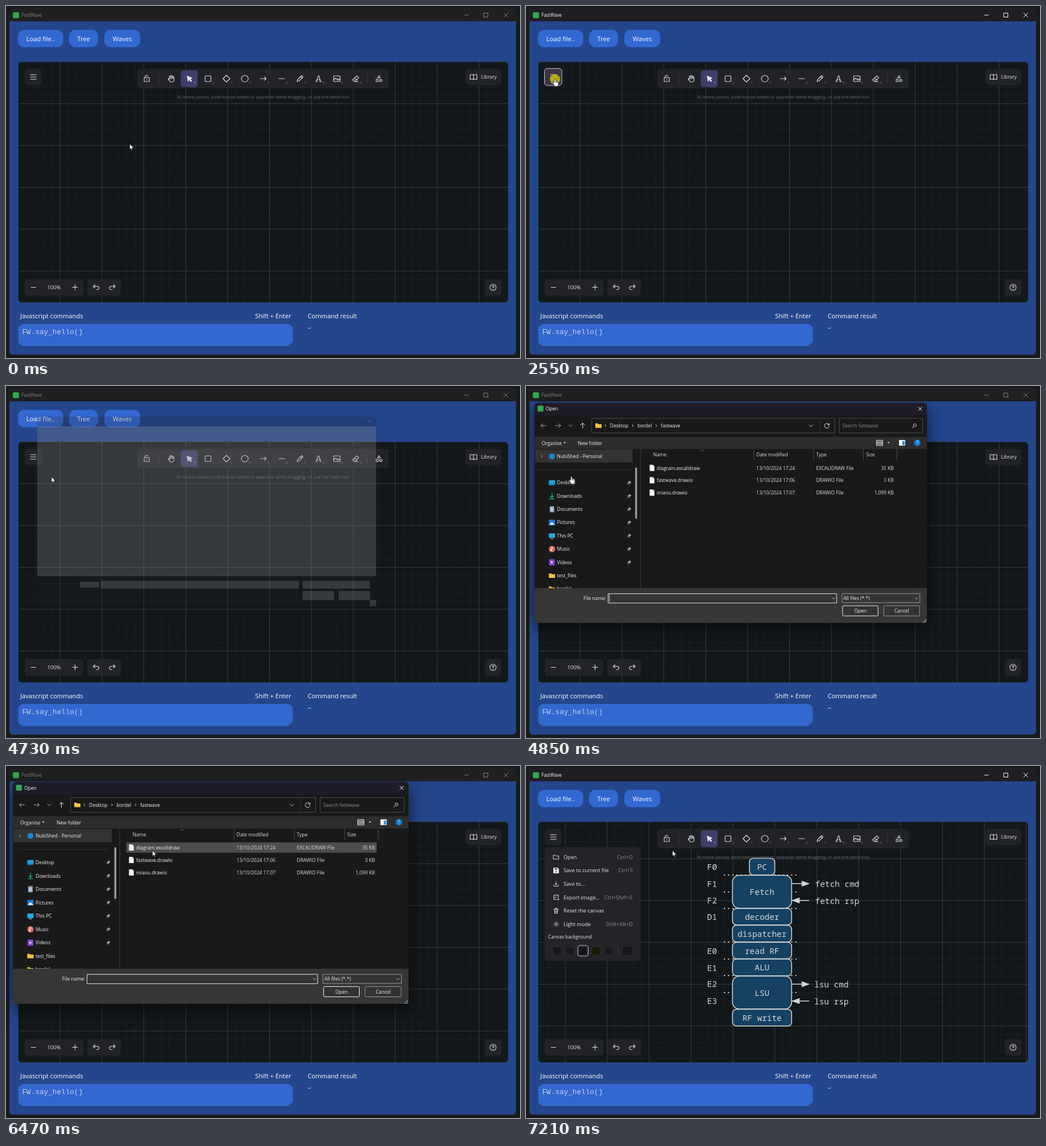
An HTML page with a canvas that plays this animation: 904x620 px, repeating every 8000 ms.

```html
<!DOCTYPE html>
<html lang="en">
<head>
<meta charset="utf-8">
<title>FastWave</title>
<style>
html, body { margin: 0; width: 100%; height: 100%; overflow: hidden; background: #191a1c; }
canvas { display: block; }
</style>
</head>
<body>
<canvas id="stage" width="904" height="620"></canvas>
<script>
const g = document.getElementById('stage').getContext('2d');
const SANS = '"Open Sans", "Noto Sans", sans-serif';
const CODE = '"Liberation Mono", monospace';
const MONO = '"Noto Sans Mono", monospace';
const LIGHT = '#e0e0e6', ISLAND = '#222327', GREY = '#8f8f95';

// ---- helpers ----
function text(s, x, y, size, color = '#fff', align = 'left', font = SANS) {
  g.font = size + 'px ' + font;
  g.fillStyle = color;
  g.textAlign = align;
  g.fillText(s, x, y + size * 0.357);
}
// Rounded box given by its left, top, right and bottom edges
function box(l, t, r, b, radius, fill, stroke, w = 1) {
  g.beginPath();
  g.roundRect(l, t, r - l, b - t, radius);
  if (fill) { g.fillStyle = fill; g.fill(); }
  if (stroke) { g.strokeStyle = stroke; g.lineWidth = w; g.stroke(); }
}
function icon(d, x, y, stroke = LIGHT, w = 1.1, fill) {
  const p = new Path2D(d);
  g.save();
  g.translate(x, y);
  g.lineCap = g.lineJoin = 'round';
  if (fill) { g.fillStyle = fill; g.fill(p); }
  if (stroke) { g.strokeStyle = stroke; g.lineWidth = w; g.stroke(p); }
  g.restore();
}
function dot(x, y, r, fill) {
  g.beginPath();
  g.arc(x, y, r, 0, 7);
  g.fillStyle = fill;
  g.fill();
}
const between = (t, a, b) => t >= a && t < b;

const CROSS = 'M-3-3L3 3M-3 3L3-3';
const CHEVRON = 'M-1-2L1 0L-1 2', DOWN = 'M-3-1.5L0 1.5L3-1.5', CARET = 'M-2.2-1.2H2.2L0 1.2Z';
const FOLDER = 'M-5.5-4H-1.5L0-2.5H5.5V4H-5.5Z';
const PAGE = 'M-4-5.5H2L4.5-3V5.5H-4Z';

// ---- pointer ----
const moves = [
  [660, 1420, 67.5, 143.5],
  [1490, 1690, 51, 129],
  [3280, 3770, 80, 160],
  [5370, 6060, 257.5, 149]
];
function pointer(t) {
  let x = 217.5, y = 243;
  for (const [a, b, tx, ty] of moves) {
    const k = Math.min(1, Math.max(0, (t - a) / (b - a))), e = k * k * (3 - 2 * k);
    x += (tx - x) * e;
    y += (ty - y) * e;
  }
  return { x, y };
}
function drawPointer(p, hand) {
  if (hand) icon('M0-.5Q-1.3-.5-1.3 1V6L-2.6 5Q-4 5-3.7 6.7L-1 11V12.5H5V11L6 8.5V4.5Q5.5 3.4 4.3 3.9Q3.5 3 2.6 3.5Q2 2.9 1.2 3.2V1Q1.2-.5 0-.5ZM1.2 3.5V6M2.8 4V6M4.4 4.5V6.2',
    p.x, p.y, '#222', 0.7, '#fff');
  else icon('M0 0V9.7L2.2 7.7L3.7 11L5.2 10.3L3.8 7.1H6.9Z', p.x, p.y, '#000', 0.7, '#fff');
}

// ---- main window ----
function windowFrame(active) {
  const ink = active ? '#fff' : '#858585';
  g.fillStyle = '#191a1c';
  g.fillRect(0, 0, 904, 620);
  box(6, 5, 897, 614, 6, '#24468c', '#2b3a58', 0.6);
  box(6, 5, 897, 27, [6, 6, 0, 0], active ? '#1f1e24' : '#202021');
  box(12, 11, 23, 21.5, 2, '#2fa84f');
  text('FastWave', 27, 16, 8.1, ink);
  icon('M-3.5 0H3.5', 810, 16, ink, 1);
  icon('M-3.5-3.5H3.5V3.5H-3.5Z', 844, 16, ink, 1);
  icon('M-3.5-3.5L3.5 3.5M-3.5 3.5L3.5-3.5', 879, 16, ink, 1);

  for (const [s, l, r] of [['Load file..', 21, 100.5], ['Tree', 111, 162], ['Waves', 173, 236]]) {
    box(l, 42, r, 72.5, 11, '#3268d0');
    text(s, (l + r) / 2, 58, 11.15, '#fff', 'center');
  }
  text('Javascript commands', 25, 546, 11.15);
  text('Shift + Enter', 501.5, 546, 11.15, '#fff', 'right');
  text('Command result', 530.5, 546, 11.15);
  text('–', 531, 566, 11.15);
  box(22, 560.5, 504, 598.5, 9, '#3268d0', '#3d6fc9', 0.8);
  text('FW.say_hello()', 28.5, 573, 12.7, '#c3d2f0', 'left', CODE);
  icon('M-3 3L3-3M0 3L3 0', 500, 595, '#14213f', 0.8);
}

function grid(x0, y0) {
  const step = 14.74;
  const line = (i, pos, vertical) => {
    const major = i % 5 === 0;
    g.strokeStyle = major ? '#3a3e3f' : '#23282b';
    g.setLineDash(major ? [] : [2.2, 2.2]);
    g.beginPath();
    if (vertical) { g.moveTo(pos, 98); g.lineTo(pos, 522); }
    else { g.moveTo(21, pos); g.lineTo(883, pos); }
    g.stroke();
  };
  g.lineWidth = 1;
  for (const wanted of [false, true])
    for (let i = -10; i < 65; i++) {
      if ((i % 5 === 0) !== wanted) continue;
      line(i, x0 + i * step, true);
      line(i, y0 + i * step, false);
    }
  g.setLineDash([]);
}

function diagram() {
  const ink = '#d6d6d6';
  g.strokeStyle = ink;
  g.lineWidth = 2;
  g.setLineDash([2, 5.4]);
  for (const y of [192, 222, 251, 310, 340, 369, 399]) {
    g.beginPath();
    g.moveTo(348, y);
    g.lineTo(478, y);
    g.stroke();
  }
  g.setLineDash([]);
  const label = (s, x, y, a = 'left') => text(s, x, y, 14.4, ink, a, MONO);
  const blocks = [['PC', 162.5, 192], ['Fetch', 192.5, 250.5], ['decoder', 251, 280], ['dispatcher', 280.5, 310],
    ['read RF', 310.5, 339.5], ['ALU', 340, 369.5], ['LSU', 370, 428], ['RF write', 428.5, 458]];
  for (const [s, top, bottom] of blocks) {
    const half = s === 'PC' ? 22.3 : 52;
    box(415.2 - half, top, 415.2 + half, bottom, bottom - top > 40 ? 12 : 7, '#154163', ink, 1.5);
    label(s, 415.2, (top + bottom) / 2 + 0.5, 'center');
  }
  const stages = { F0: 178, F1: 208, F2: 237, D1: 265.5, E0: 325.5, E1: 355.5, E2: 384, E3: 414 };
  for (const s in stages) label(s, 318.5, stages[s]);
  const arrow = (y, out, s, x) => {
    icon('M0 0H30', 467.5, y, ink, 1.5);
    icon(out ? 'M18-4.5L30 0L18 4.5Z' : 'M13-4.5L1 0L13 4.5Z', 467.5, y, ink, 1, ink);
    label(s, x, y + 1);
  };
  arrow(207.3, true, 'fetch cmd', 508.5);
  arrow(236.8, false, 'fetch rsp', 508.5);
  arrow(384.3, true, 'lsu cmd', 507);
  arrow(414, false, 'lsu rsp', 507);
}

const tools = [
  ['M-4.5-2H4.5V5H-4.5ZM-2.5-2V-4Q-2.5-6 0-6Q1.8-6 2.3-4.5M0 1V2', 247.5],
  ['M-3 1V-4Q-2-5.5-1-4V0M-1-4.5Q0-7 1-4.5V0M1-4Q2.3-5.5 3-4V0M3-2.5Q4.3-4 5-2.5V2Q4.5 6 1 6Q-2 6-3.5 3L-5 .5Q-4.5-1-3 1', 290.5],
  ['M-4.5-4.5L4.5-1L.8.6L3.5 4L2 5L-.6 1.6L-2.8 4.5Z', 323],
  ['M-4.2-5H4.2Q5.2-5 5.2-4V4Q5.2 5 4.2 5H-4.2Q-5.2 5-5.2 4V-4Q-5.2-5-4.2-5Z', 355.3],
  ['M0-6L6 0L0 6L-6 0Z', 387.8],
  ['M6 0A6 5.7 0 1 1-6 0A6 5.7 0 1 1 6 0Z', 420],
  ['M-5 0H5M2.2-2.8L5 0L2.2 2.8', 452.5],
  ['M-5 0H5', 485],
  ['M-5 5L-4 1.5L2.7-5Q4-5.5 5-4Q5.5-3 4.5-2L-2 4.3ZM1.2-3.5L3.7-1', 517],
  ['M-5 5H-2.3M2 5H5M-3.8 5L-.2-5H.8L4 5M-2.5 2H2.5', 549.5],
  ['M-4.7-5H4.7Q5.7-5 5.7-4V4Q5.7 5 4.7 5H-4.7Q-5.7 5-5.7 4V-4Q-5.7-5-4.7-5ZM-5.7 2.5L-2-1L2 3M1 2L3 .3L5.7 3M2-2.3H2.2', 582],
  ['M-5.3 2L2-5L5.5-1.7L-1.2 5H-2.5ZM-2.2-1L2 2.5M-1 5H4.5', 615],
  ['M0-5.5L2.5-1.5H-2.5ZM-5 1H-1.2V5H-5ZM5.3 3A2 2 0 1 1 1.3 3A2 2 0 1 1 5.3 3Z', 656]
];

function controls(t, p, overButton, pressed) {
  box(231, 110.5, 673, 145, 6, ISLAND);
  box(307.5, 113, 337.3, 142.8, 5, '#403e6a');
  icon('M0-8V8M366.5-8V8', 269, 128, '#38383f', 1);
  tools.forEach(([d, x], i) => {
    icon(d, x, 128, LIGHT, 1.1, i === 2 ? LIGHT : null);
    if (i > 1 && i < 12) text((i - 1) % 10, x + 9, 135.2, 5.8, i === 2 ? '#e0e0e6' : '#77777f', 'center');
  });
  text('To move canvas, hold mouse wheel or spacebar while dragging, or use the hand tool', 452, 160.3, 7.76, '#66696b', 'center');

  box(33, 110.5, 62.3, 139.5, 5, overButton ? '#36343f' : ISLAND);
  if (pressed) box(32.5, 110, 63, 140, 5, '#3a3342', '#c9c5ee', 1);
  icon('M-5-4H5M-5 0H5M-5 4H5', 48, 125);
  box(808, 110.5, 871, 139.5, 5, ISLAND);
  icon('M0-3.5Q-3-5-6-3.7V4.3Q-3 3 0 4.5Q3 3 6 4.3V-3.7Q3-5 0-3.5V4.5', 822.3, 125);
  text('Library', 835.5, 125, 8.5, LIGHT);
  box(33, 481, 136, 510.3, 5, ISLAND);
  icon('M-4 0H4', 48, 495.5);
  text('100%', 84.5, 495.5, 9.6, LIGHT, 'center');
  icon('M-4.5 0H4.5M0-4.5V4.5', 121.5, 495.5);
  box(143, 481, 202, 510.3, 5, ISLAND);
  const undo = 'M-2-4.5L-5-1.7L-2 1M-5-1.7H2Q5-1.5 5 1.3Q5 4 2 4H.5';
  icon(undo, 158.5, 495.5);
  g.save();
  g.translate(187, 495.5);
  g.scale(-1, 1);
  icon(undo, 0, 0);
  g.restore();
  box(842, 481, 871, 510.3, 5, ISLAND);
  icon('M5.5 0A5.5 5.5 0 1 1-5.5 0A5.5 5.5 0 1 1 5.5 0ZM-1.6-1.4Q-1.4-3 0-3Q1.7-2.9 1.6-1.4Q1.4-.4 0 .4V1M0 2.8V2.9', 856.5, 495.5);
}

const menuItems = [
  ['Open', 'Ctrl+O', 'M-4.5-3.5H-1.5L0-2H4.5V3.5H-4.5Z'],
  ['Save to current file', 'Ctrl+S', 'M-4-4.5H2.5L4.5-2.5V4.5H-4.5V-4.5Z'],
  ['Save to...', '', 'M-4 2V4H4V2M0-4V1.5M-2-.5L0 1.5L2-.5'],
  ['Export image...', 'Ctrl+Shift+E', 'M0 4H-4V-4H4V0M-4 2L-1-1L1 1M2-2H2.1M2 3.5H5M3.5 2L5 3.5L3.5 5'],
  ['Reset the canvas', '', 'M-4-2.7H4M-3-2.7L-2.5 4.5H2.5L3-2.7M-1.2-2.7V-4.3H1.2V-2.7M-1-.5V2.5M1-.5V2.5'],
  ['Light mode', 'Shift+Alt+D', 'M2 0A2 2 0 1 1-2 0A2 2 0 1 1 2 0ZM0-4.5V-4M0 4V4.5M-4.5 0H-4M4 0H4.5M-3-3H-2.9M3-3H2.9M-3 3H-2.9M3 3H2.9']
];
function menu(overOpen, picked) {
  box(33, 143, 201.3, 343.5, 6, '#232329');
  if (overOpen) box(39, 147.5, 195, 174.5, 5, '#36343f');
  menuItems.forEach(([s, keys, d], i) => {
    const y = 160.5 + i * 23.6;
    icon(d, 53, y, LIGHT, 1, i === 1 ? LIGHT : null);
    if (i === 1) icon('M-2-3.5H1.5V-1.7H-2ZM-1 2.2A1 1 0 1 0 1 2.2A1 1 0 1 0-1 2.2Z', 53, y, null, 0, '#232329');
    text(s, 66, y, 9.15, '#ececf0');
    text(keys, 187.7, y, 9.15, GREY, 'right');
  });
  text('Canvas background', 39, 301.5, 8.4, '#ececf0');
  for (let i = 0; i < 5; i++) {
    const x = 54.5 + i * 22.9;
    box(x - 7.5, 318, x + 7.5, 333, 3, ['#15181b', '#161a1d', '#13171a', '#1a1805', '#171a1d'][i], '#34343c', 0.8);
    if (picked && i === 2) box(x - 9.3, 316, x + 9.2, 334.8, 4, null, '#b5b1e8', 1.1);
  }
  icon('M0-8V8', 162, 325.5, '#38383f', 1);
  box(169.5, 317, 187, 334, 3, '#13171a', '#34343c', 0.8);
}

// ---- file dialog ----
const places = ['Desktop', 'Downloads', 'Documents', 'Pictures', 'This PC', 'Music', 'Videos', 'test_files', 'bordel'];
function placeIcon(i, x, y) {
  const screen = c => box(x - 5.5, y - 4.5, x + 5.5, y + 3.5, 1, c);
  if (i === 0) { screen('#1ba3dc'); box(x - 5.5, y + 2, x + 5.5, y + 4.5, 1, '#1579b8'); }
  if (i === 1) icon('M0-5V3M-3 .3L0 3L3 .3M-4 5H4', x, y, '#1fb47c', 1.3);
  if (i === 2) { box(x - 4, y - 5.5, x + 4, y + 5.5, 1, '#8ba3b8'); icon('M-2-2H2M-2 0H2M-2 2H2', x, y, '#e6eef5', 1); }
  if (i === 3) { box(x - 5.5, y - 5, x + 5.5, y + 5, 1, '#1a80d8'); icon('M-5 4L0-1L5 4Z', x, y, null, 0, '#e8f4ff'); }
  if (i === 4) { screen('#27a9e1'); icon('M-2.5 5H2.5', x, y, '#9fb4c0', 1.2); }
  if (i === 5) { dot(x, y, 5.7, '#d8675c'); icon('M-.5 2V-3L2-2', x, y, '#fff', 1.1); dot(x - 1.4, y + 2, 1.4, '#fff'); }
  if (i === 6) { box(x - 5, y - 5.5, x + 5, y + 5.5, 1.5, '#8a45d6'); icon('M-1.5-2.3L2.3 0L-1.5 2.3Z', x, y, null, 0, '#fff'); }
  if (i > 6) icon(FOLDER, x, y, null, 0, '#f5c342');
}
const files = [
  ['diagram.excalidraw', '17:24', 'EXCALIDRAW File', '35 KB'],
  ['fastwave.drawio', '17:06', 'DRAWIO File', '3 KB'],
  ['miaou.drawio', '17:07', 'DRAWIO File', '1,099 KB']
];
function dialog(t, p) {
  const F = 8.45, ink = '#f2f2f2', bg = '#191919';
  const label = (s, x, y, c = ink, a) => text(s, x, y, F, c, a);
  g.save();
  g.shadowColor = 'rgba(0,0,0,.6)';
  g.shadowBlur = 28;
  g.shadowOffsetY = 9;
  box(12, 28, 708, 419, 6, '#363636');
  g.restore();
  box(12, 28, 708, 60, [6, 6, 0, 0], '#1f1b29');
  box(17.5, 33, 28, 43.5, 2, '#2fa84f');
  const head = t < 6940 ? '#fff' : '#8a8a8a';
  label('Open', 32, 38.5, head);
  icon(CROSS, 696, 38.5, head, 1);

  // navigation row
  box(12, 50, 708, 357, 0, bg);
  icon('M4.5 0H-4.5M-1-3.5L-4.5 0L-1 3.5', 28, 68.5, '#aaa', 1);
  icon('M-4.5 0H4.5M1-3.5L4.5 0L1 3.5', 54, 68.5, '#aaa', 1);
  icon(DOWN, 76, 68.5, '#aaa', 1);
  icon('M0 4.5V-4.5M-3.5-1L0-4.5L3.5-1', 97.5, 68.5, ink, 1);
  box(113.5, 55.5, 544.5, 81.5, 0, bg, '#4c4c4c', 1);
  icon('M518.5 55V82', 0, 0, '#333', 1);
  icon(FOLDER, 125.5, 68.5, null, 0, '#f5c342');
  ['Desktop', 'bordel', 'fastwave'].forEach((s, i) => {
    const x = [146, 194.5, 236][i];
    icon(CHEVRON, x - 8, 68.5, '#ddd', 1);
    label(s, x, 68.5);
  });
  icon(DOWN, 502.5, 69, '#ddd', 1);
  icon('M4-2A4.3 4.3 0 1 0 4.3 .8M4.3-4.3V-1.7H1.6', 530.5, 69, '#ddd', 1);
  box(552.5, 55.5, 700.5, 81.5, 0, bg, '#4c4c4c', 1);
  label('Search fastwave', 558, 69, '#8c8c8c');
  icon('M3.7-1.3A2.5 2.5 0 1 1-1.3-1.3A2.5 2.5 0 1 1 3.7-1.3ZM-.6 .6L-3.7 3.7', 685.5, 69, '#ccc', 1);

  // command row
  box(12, 88.5, 708, 110, 0, '#2d2d2d');
  label('Organise', 25, 99.5);
  icon(CARET, 65.5, 99, null, 0, '#ddd');
  label('New folder', 89, 99.5);
  box(618.5, 94.5, 629.5, 104, 0, '#555', '#ddd', 1);
  icon('M-5-2H5M-5 0H5M-5 2H5', 624, 99.2, '#ddd', 0.8);
  icon(CARET, 640, 99, null, 0, '#ddd');
  box(658.5, 94, 669.5, 104, 0, '#f4f4f4');
  box(664.5, 96, 668.5, 103, 0, '#2a8fe0');
  dot(691, 99, 5.8, '#0f7cd6');
  text('?', 691, 99, 8.5, '#fff', 'center');

  // places
  box(13, 111, 186, 134, 0, '#333');
  icon(CHEVRON, 25, 123, '#aaa', 1);
  dot(43, 123, 5.2, '#1987d8');
  label('NubiShed - Personal', 52, 123);
  icon('M21 147H181', 0, 0, '#333', 1);
  if (t >= 4980 && p.x < 186 && p.y > 158.3) box(13, 158, 186, 181, 0, '#4d4d4d');
  g.save();
  g.beginPath();
  g.rect(12, 110, 188, 247);
  g.clip();
  places.forEach((s, i) => {
    const y = 170 + i * 23.55;
    placeIcon(i, 43, y);
    label(s, 52, y);
    if (i < 7) icon('M-3 3L-.8 .8M-2.7-1L1 2.7M-1.6 0L1-3.2L3.2-1L0 1.6Z', 179.8, y, '#a8a8a8', 0.9, '#a8a8a8');
  });
  g.restore();
  if (p.x > 187 && t < 6200) {
    box(188.5, 113, 196, 355, 3, '#2c2c2c');
    box(189.5, 143, 195, 234, 2.5, '#9d9d9d');
    icon('M-2 1.2H2L0-1.5Z', 192.2, 118, null, 0, '#9d9d9d');
    icon('M-2-1.2H2L0 1.5Z', 192.2, 350, null, 0, '#9d9d9d');
  } else box(190.5, 143, 194, 234, 1.5, '#9a9a9a');
  icon('M200 111V356', 0, 0, '#303030', 1.5);

  // files
  icon('M-2.5 1.3L0-1.3L2.5 1.3', 309.5, 112.5, '#999', 0.8);
  [['Name', 222.5], ['Date modified', 405.5], ['Type', 511.5], ['Size', 600]].forEach(([s, x]) => label(s, x, 120.5, '#ddd'));
  icon('M401 111V130M507 111V130M595.5 111V130M654.5 111V130', 0, 0, '#4a4a4a', 1);
  if (p.x > 211 && p.y < 153) box(211.5, 134.5, 652, 152.7, 0, t >= 6740 ? '#686868' : '#4d4d4d');
  files.forEach(([name, hour, type, size], i) => {
    const y = 144 + i * 22;
    icon(PAGE, 220.3, y - 0.5, null, 0, '#f3f3f3');
    icon('M2-5.5V-3H4.5', 220.3, y - 0.5, '#999', 0.7);
    label(name, 229, y);
    label('13/10/2024 ' + hour, 405.5, y, '#ddd');
    label(type, 511.5, y, '#ddd');
    label(size, 649, y, '#ddd', 'right');
  });

  // footer
  label('File name:', 139, 375.3, ink, 'right');
  box(142.5, 367, 548, 383.5, 0, '#343434', '#e8e8e8', 1);
  icon('M-2.5-1.2L0 1.2L2.5-1.2', 542.5, 375.5, '#ccc', 0.9);
  if (t >= 6840) label('diagram.excalidraw', 145, 375.3);
  else if (t < 5410 || between(t, 5940, 6470)) icon('M144.8 369V381', 0, 0, '#fff', 0.8);
  box(557.5, 367, 695.5, 383, 0, '#343434', '#9b9b9b', 1);
  label('All files (*.*)', 560, 375.3);
  icon('M-2.5-1.2L0 1.2L2.5-1.2', 689.5, 375.5, '#ccc', 0.9);
  box(558.5, 388.5, 621.5, 406.5, 2, '#333', '#f0f0f0', 1);
  label('Open', 590, 397.7, ink, 'center');
  box(631.5, 388.5, 695, 406.5, 2, '#333', '#9b9b9b', 1);
  label('Cancel', 663.3, 397.7, ink, 'center');
  for (let i = 0; i < 3; i++)
    for (let j = 0; j <= i; j++) box(700.5 + i * 2.4, 417 - j * 2.4, 702 + i * 2.4, 418.4 - j * 2.4, 0, '#aaa');
}

// Faint panels shown for a moment before the dialog has its contents
function ghost() {
  const veil = 'rgba(255,255,255,.14)';
  box(55, 54, 651, 388, 5, 'rgba(32,32,36,.2)');
  box(55, 71, 651, 335, 0, veil);
  text('Open', 72, 62.5, 7.3, 'rgba(255,255,255,.12)');
  icon('M-2-2L2 2M-2 2L2-2', 640, 62.5, 'rgba(255,255,255,.2)', 1);
  for (const [x, y, w, h] of [[130, 345, 34, 10], [167, 343, 348, 14], [522, 343, 118, 14],
    [522, 361, 55, 16], [585, 361, 55, 16], [640, 377, 11, 11]]) box(x, y, x + w, y + h, 0, veil);
}

function draw(t) {
  const p = pointer(t);
  const loaded = t >= 7210;
  const firstMenu = between(t, 2610, 4290);
  const overButton = between(t, 1490, 4290) && p.x < 62.5 && p.y < 139.5;
  const overOpen = firstMenu && p.y > 147.5;

  windowFrame(between(t, 2550, 4380) || t >= 6940);
  g.save();
  g.beginPath();
  g.roundRect(21.5, 98.5, 861.5, 423.5, 6);
  g.clip();
  g.fillStyle = '#13171a';
  g.fillRect(21, 98, 863, 425);
  if (loaded) grid(69.2, 163.3); else grid(95, 172);
  if (loaded) diagram();
  g.restore();
  controls(t, p, overButton, between(t, 2550, 2610));
  if (firstMenu || loaded) menu(overOpen, loaded);

  if (between(t, 4730, 4780)) ghost();
  if (between(t, 4780, 7145)) {
    const closing = t >= 7080;
    const s = closing ? 0.95 : 1 - 0.144 * Math.exp((4730 - t) / 42.6);
    g.save();
    g.globalAlpha = closing ? 0.4 : Math.min(1, 0.7 + (t - 4780) / 220);
    g.translate(360, 223.5);
    g.scale(s, s);
    g.translate(-360, -223.5);
    dialog(t, p);
    g.restore();
  }
  if (between(t, 2550, 2610) || between(t, 4160, 4230) || between(t, 6740, 6840))
    dot(p.x, p.y, 9, 'rgba(196,186,8,.85)');
  drawPointer(p, overButton || overOpen || between(t, 4780, 4980));
}

function tick() {
  draw(performance.now() % 8000);
  requestAnimationFrame(tick);
}
tick();
</script>
</body>
</html>
```
